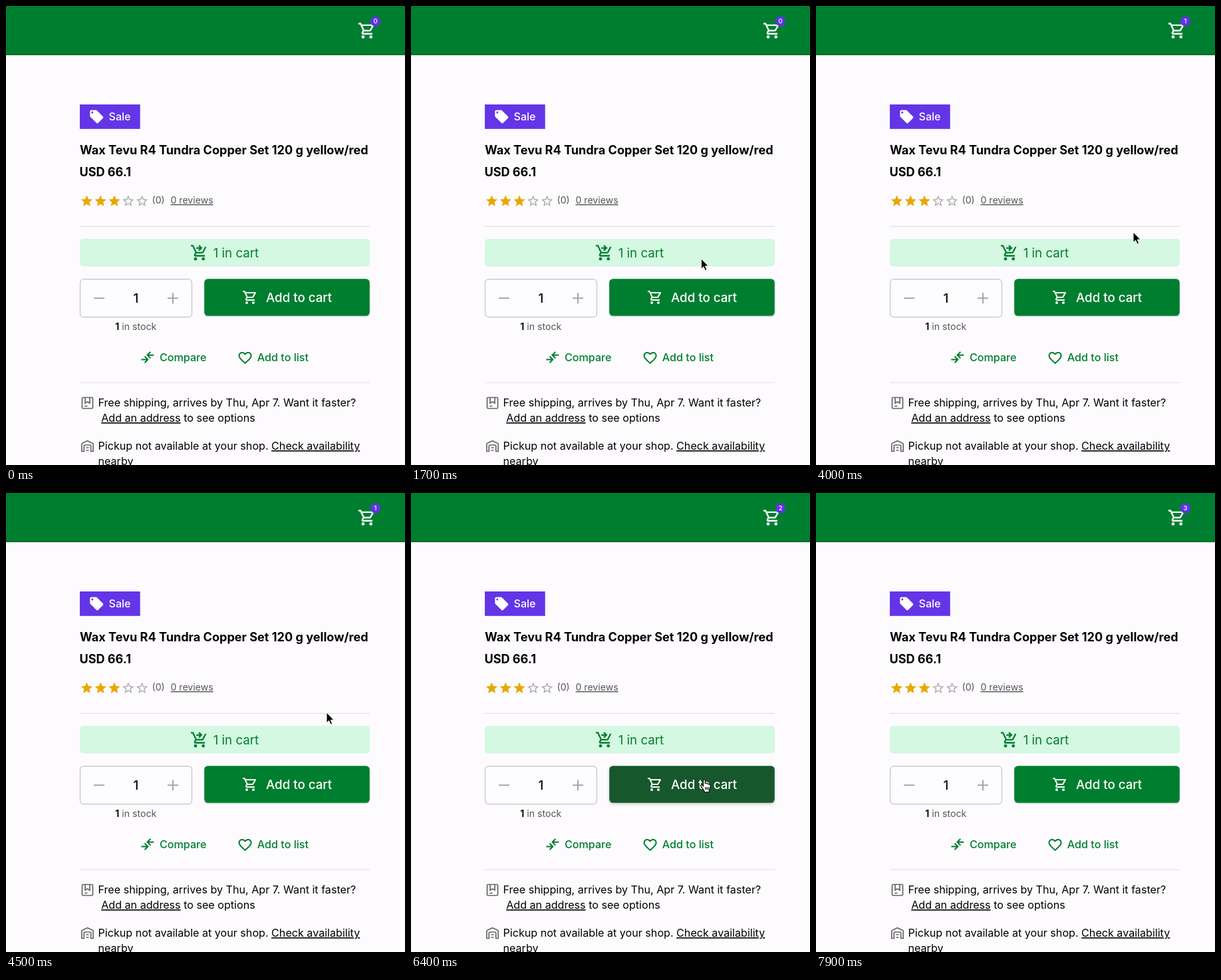
An HTML page for the animation above (8 s loop, 600 by 690 pixels).

```html
<!DOCTYPE html>
<html lang="en">
<head>
<meta charset="utf-8">
<title>Add to cart</title>
<style>
html, body { margin: 0; width: 100%; height: 100%; overflow: hidden; background: #fdfbfe; }
svg { display: block; font: 16.13px Inter, "Liberation Sans", sans-serif; }
.m { font-weight: 500; }
.b { font-weight: 700; }
.big { font-size: 18.72px; }
.small { font-size: 14.1px; fill: #555; }
.u { text-decoration: underline; }
.green { fill: #007e2f; }
.white { fill: #fff; }
.line { fill: none; stroke-width: 2; }
.grey { stroke: #666; stroke-width: 1.7; }
</style>
</head>
<body>
<svg width="600" height="690" viewBox="0 0 600 690">
  <defs>
    <g id="wheels"><circle cx="7" cy="20" r="2"/><circle cx="17" cy="20" r="2"/></g>
    <g id="cart">
      <use href="#wheels"/>
      <path d="M15.55 13c.75 0 1.41-.41 1.75-1.03l3.58-6.49c.37-.66-.11-1.48-.87-1.48H5.21l-.94-2H1v2h2l3.6 7.59-1.35 2.44C4.52 15.37 5.48 17 7 17h12v-2H7l1.1-2h7.45zM6.16 6h12.15l-2.76 5H8.53z"/>
    </g>
    <path id="full" d="M12 17.27L18.18 21l-1.64-7.03L22 9.24l-7.19-.61L12 2 9.19 8.63 2 9.24l5.46 4.73L5.82 21z" fill="#e8a703"/>
    <path id="empty" d="M22 9.24l-7.19-.62L12 2 9.19 8.63 2 9.24l5.46 4.73L5.82 21 12 17.27 18.18 21l-1.63-7.03zM12 15.4l-3.76 2.27 1-4.28-3.32-2.88 4.38-.38L12 6.1l1.71 4.04 4.38.38-3.32 2.88 1 4.28z" fill="#aaa"/>
  </defs>

  <!-- Header -->
  <rect width="600" height="74" fill="#007e2f"/>
  <rect y="71.5" width="600" height="2.5" fill="#00702a"/>
  <use href="#cart" class="white" transform="translate(528.8 23) scale(1.17)"/>
  <circle cx="555.6" cy="22.9" r="7.5" fill="#6034e4"/>
  <text id="count" class="white m" x="555.6" y="26.4" font-size="9.5" text-anchor="middle">0</text>

  <!-- Product -->
  <rect x="111" y="148" width="90.7" height="36.8" fill="#6335e7"/>
  <path class="white" transform="translate(124.3 154.4)" d="M21.41 11.58l-9-9C12.05 2.22 11.55 2 11 2H4c-1.1 0-2 .9-2 2v7c0 .55.22 1.05.59 1.42l9 9c.36.36.86.58 1.41.58s1.05-.22 1.41-.59l7-7c.37-.36.59-.86.59-1.41s-.23-1.06-.59-1.42zM5.5 7C4.67 7 4 6.33 4 5.5S4.67 4 5.5 4 7 4.67 7 5.5 6.33 7 5.5 7z"/>
  <text class="white m" x="154.5" y="172">Sale</text>
  <g class="b" font-size="18.1">
    <text x="111" y="223">Wax Tevu R4 Tundra Copper Set 120 g yellow/red</text>
    <text x="110.4" y="256">USD 66.1</text>
  </g>
  <g id="stars"></g>
  <text class="small" x="219.5" y="297">(0)</text>
  <text class="small u" x="247.5" y="297">0 reviews</text>
  <path d="M111 331.3H547M111 566H547" stroke="#dfdde0" stroke-width="1.2"/>

  <!-- Cart controls -->
  <rect x="111" y="350" width="436" height="41.5" rx="5" fill="#d4f8e1"/>
  <g class="green" transform="translate(276.8 356.8) scale(1.17)">
    <use href="#wheels"/>
    <path d="M8.1 13h7.45c.75 0 1.41-.41 1.75-1.03L21 4.96 19.25 4l-3.7 7H8.53L4.27 2H1v2h2l3.6 7.59-1.35 2.44C4.52 15.37 5.48 17 7 17h12v-2H7zM12 2l4 4-4 4-1.41-1.41L12.17 7H8V5h4.17l-1.59-1.59z"/>
  </g>
  <text class="green big" x="311.7" y="377.5">1 in cart</text>
  <rect x="111.5" y="410.7" width="168" height="57" rx="5.5" fill="#fdfcff" stroke="#c3c2c5" stroke-width="1.2"/>
  <path class="line" stroke="#a6a6a8" d="M132 439.2h16M243 439.2h16M251 431.2v16"/>
  <text class="big m" x="195.3" y="445.8" text-anchor="middle">1</text>
  <rect id="btn" x="298.2" y="410.2" width="248.6" height="55.6" rx="5.5"/>
  <use href="#cart" class="white" x="355" y="426"/>
  <text class="white big m" x="391" y="444.5">Add to cart</text>
  <text class="small" x="164.3" y="486.5"><tspan class="b" fill="#111">1</tspan> in stock</text>

  <path class="line" stroke="#007e2f" d="M203.3 531.5h9M208.5 526.7l4.8 4.8-4.8 4.8M222.3 524.8h-9M217.3 520l-4.8 4.8 4.8 4.8"/>
  <text class="green m" x="231" y="534">Compare</text>
  <path class="green" transform="translate(347.6 517)" d="M16.5 3c-1.74 0-3.41.81-4.5 2.09C10.91 3.81 9.24 3 7.5 3 4.42 3 2 5.42 2 8.5c0 3.78 3.4 6.86 8.55 11.54L12 21.35l1.45-1.32C18.6 15.36 22 12.28 22 8.5 22 5.42 19.58 3 16.5 3zm-4.4 15.55l-.1.1-.1-.1C7.14 14.24 4 11.39 4 8.5 4 6.5 5.5 5 7.5 5c1.54 0 3.04.99 3.57 2.36h1.87C13.46 5.99 14.96 5 16.5 5c2 0 3.5 1.5 3.5 3.5 0 2.89-3.14 5.74-7.9 10.05z"/>
  <text class="green m" x="377.8" y="534">Add to list</text>

  <!-- Delivery -->
  <path class="line grey" d="M116 588.5h13q1.5 0 1.5 1.5v13.5q0 1.5-1.5 1.5h-13q-1.5 0-1.5-1.5v-13.5q0-1.5 1.5-1.5zM119 589v8l3.5-2 3.5 2v-8M118 601.5h4.5"/>
  <text x="138.5" y="602">Free shipping, arrives by Thu, Apr 7. Want it faster?</text>
  <text x="143.2" y="625"><tspan class="u">Add an address</tspan> to see options</text>
  <path class="line grey" d="M113.8 669.5v-10.5q0-1.5 1.5-2l7.2-3.2 7.2 3.2q1.5.5 1.5 2v10.5h-3.5v-8q0-1.5-1.5-1.5h-7.4q-1.5 0-1.5 1.5v8zM120.5 664h4M120.5 668h4"/>
  <text x="138.5" y="667">Pickup not available at your shop. <tspan class="u">Check availability</tspan></text>
  <text x="138.5" y="690">nearby</text>

  <g id="cursor">
    <path id="arrow" d="M0 0V15.5L3.6 12.2 6 17.8 8.6 16.7 6.2 11.2H11Z" stroke="#fff"/>
    <g id="hand" stroke="#111" stroke-width="1.2" stroke-linejoin="round">
      <path fill="#fff" d="M4.5 11V2.2Q4.5.6 5.9.6T7.3 2.2V6.5Q7.6 5.6 9 6.1 10 6.4 10.1 7.2 11 6.4 12.2 7.1 12.8 7.5 12.8 8.3 15 7.6 15.2 9.8 15.4 13 13.6 15.8L13 19.5H6.2L5.5 17Q3 13.5.8 10.4.2 9 1.6 8.6 3 8.4 4.5 11Z"/>
      <path d="M7.8 12v4M10 12v4M12.2 12v4"/>
    </g>
  </g>
</svg>
<script>
const LOOP = 8000, STEP = 100;
const $ = id => document.getElementById(id);
const clicks = [3100, 5900, 6900];
// Pointer stops: time, x, y
const stops = [
  [200, 548, 40], [1200, 445, 355], [1500, 441, 366], [2300, 411, 454], [3300, 411, 454],
  [4000, 477, 340], [4500, 482, 330], [5200, 435, 430], [7200, 435, 430], [7700, 480, 330]
];

$("stars").innerHTML = [0, 1, 2, 3, 4].map(i =>
  `<use href="#${i < 3 ? "full" : "empty"}" transform="translate(${111 + 20.8 * i} 282.8) scale(.867)"/>`).join("");

const mix = (a, b, k) => a + (b - a) * k;

function pointer(t) {
  const i = stops.findIndex(s => s[0] > t);
  if (i < 1) return null;
  const [t0, x0, y0] = stops[i - 1], [t1, x1, y1] = stops[i];
  const p = (t - t0) / (t1 - t0), k = p * p * (3 - 2 * p);
  return [mix(x0, x1, k), mix(y0, y1, k)];
}

function hovers(t) {
  const p = pointer(t);
  return p && p[0] > 298 && p[0] < 547 && p[1] > 410 && p[1] < 466 ? 1 : 0;
}

const show = (id, on) => $(id).style.display = on ? "" : "none";

function draw(now) {
  const t = Math.floor(now % LOOP / STEP) * STEP;
  const p = pointer(t), over = hovers(t);
  show("cursor", p);
  if (p) $("cursor").setAttribute("transform", `translate(${p})`);
  show("arrow", !over);
  show("hand", over);
  const shade = (over + hovers(t - STEP)) / 2;
  $("btn").setAttribute("fill", `rgb(${mix(0, 22, shade)},${mix(126, 88, shade)},${mix(47, 44, shade)})`);
  $("btn").style.filter = `drop-shadow(0 ${mix(1, 2, shade)}px ${mix(1, 2, shade)}px #0003)`;
  $("count").textContent = clicks.filter(c => c <= t).length;
}

const start = performance.now();
function tick() {
  draw(performance.now() - start);
  requestAnimationFrame(tick);
}
tick();
</script>
</body>
</html>
```
